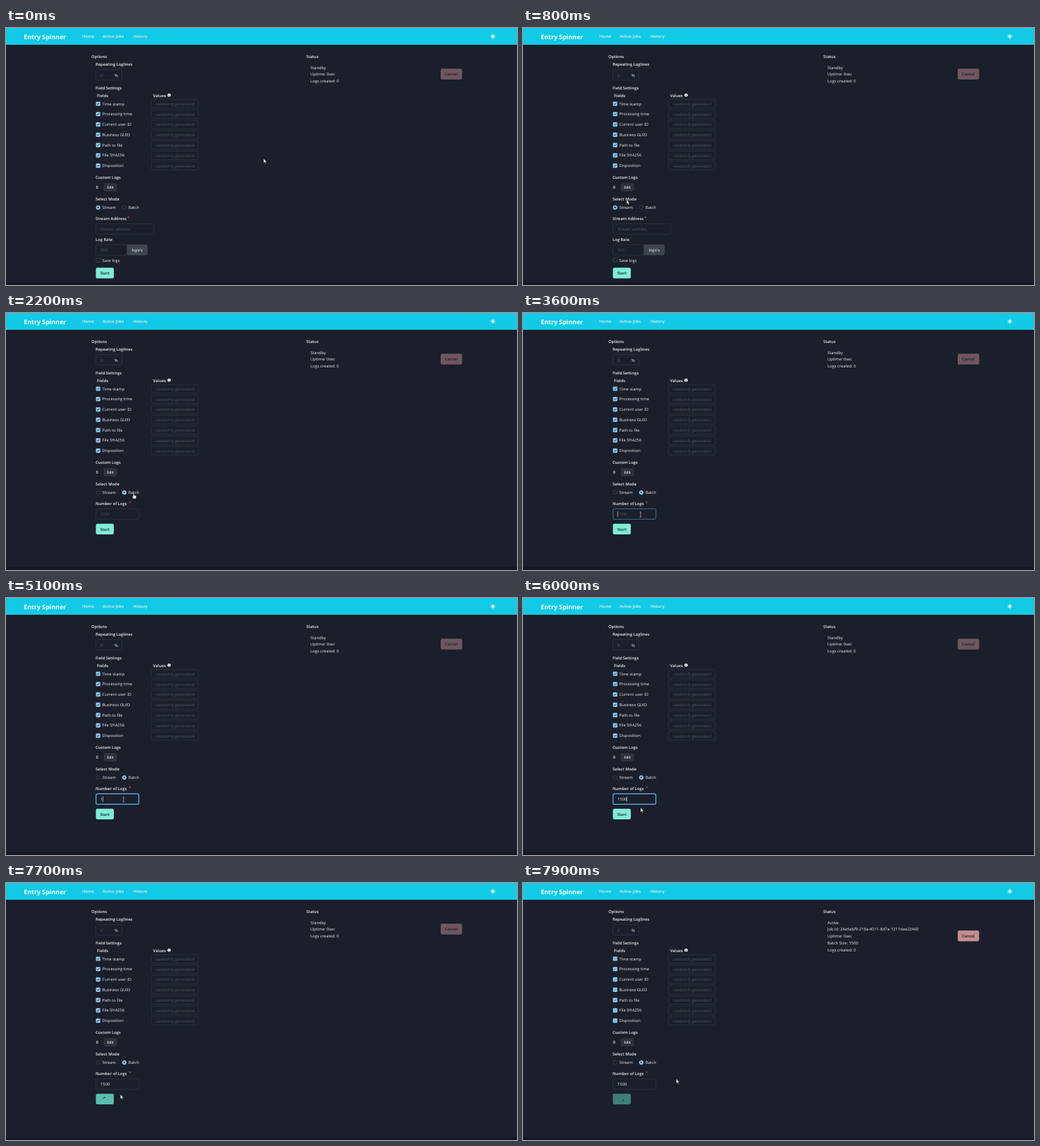
An HTML page that plays this animation: 730 px wide and 368 px high, repeating every 8000 ms.

```html
<!DOCTYPE html>
<html lang="en">
<head>
<meta charset="utf-8">
<title>Form demo</title>
<style>
  html, body { margin: 0; width: 100%; height: 100%; overflow: hidden; background: #1a1f2b; }
  svg { display: block; width: 730px; height: 368px; }
  text {
    font: 5.8px "Open Sans", "Noto Sans", sans-serif;
    fill: #eceef2; text-rendering: geometricPrecision; white-space: pre;
  }
  .bold { font-weight: 600; }
  .hint { fill: #505662; }
  .dark { fill: #1a202c; font-weight: 600; }
  .mid { text-anchor: middle; }
  .field { fill: none; stroke: #323743; stroke-width: .7; }
</style>
</head>
<body>
<svg id="stage" viewBox="0 0 730 368"></svg>
<script>
const LOOP = 8000, STEP = 100;
const BLUE = '#90cdf4', INK = '#1a202c';

// Markup helpers; text is placed by its vertical middle.
const text = (x, y, s, cls = '', extra = '') =>
  `<text x="${x}" y="${y + 2.1}" class="${cls}" ${extra}>${s}</text>`;
const bold = (x, y, s) => text(x, y, s, 'bold');
const rect = (x, y, w, h, extra) =>
  `<rect x="${x}" y="${y}" width="${w}" height="${h}" rx="2.2" ${extra}/>`;
const field = (x, y, w, h = 15) => rect(x, y, w, h, 'class="field"');
const group = (id, body) => `<g id="${id}">${body}</g>`;
const star = x => text(x, 272, '*', '', 'style="fill:#f06a72"');

const checkbox = y =>
  `<rect x="128.5" y="${y - 3.1}" width="6.2" height="6.2" rx=".8" fill="${BLUE}"/>
   <path class="tick" d="M130 ${y}l1.2 1.3 2.1-2.6" fill="none" stroke="${INK}" stroke-width=".9"/>`;

const radio = (id, x) =>
  `<circle cx="${x}" cy="257" r="2.7" fill="none" stroke="#3d4350" stroke-width=".7"/>` +
  group(id, `<circle cx="${x}" cy="257" r="3.1" fill="${BLUE}"/><circle cx="${x}" cy="257" r="1.3" fill="${INK}"/>`);

const sun = () => {
  let rays = '';
  for (let a = 0; a < 360; a += 45)
    rays += `<path d="M695.5 9.8V8.9" transform="rotate(${a} 695.5 12)"/>`;
  return `<circle cx="695.5" cy="12" r="1.8" fill="#fff"/><g stroke="#fff" stroke-width=".9" stroke-linecap="round">${rays}</g>`;
};

const fieldNames = ['Time stamp', 'Processing time', 'Current user ID', 'Business GUID',
  'Path to file', 'File SHA256', 'Disposition'];
const fieldRows = fieldNames.map((name, i) => {
  const y = 108.5 + i * 14.77;
  return checkbox(y) + text(137.5, y, name) + field(207.6, y - 6.1, 67.3, 12.3) +
    text(214, y + .3, 'randomly generated', 'hint');
}).join('');

const lines = list => list.map((s, i) => text(435, 56.5 + i * 9.75, s)).join('');

const header = `<rect width="730" height="24" fill="#12cae6"/>
  <rect y="364" width="730" height="4" fill="#151724"/>` +
  text(25.5, 13.9, 'Entry Spinner', '', 'style="font-size:8.9px;font-weight:700;fill:#fff"') +
  bold(109, 12.3, 'Home') + bold(138, 12.3, 'Active Jobs') + bold(182, 12.3, 'History') + sun();

const options = bold(122, 40.5, 'Options') + bold(128, 51.5, 'Repeating Loglines') +
  field(128.5, 59.5, 37) + text(135, 67.5, '0', 'hint') + text(157.5, 67.5, '%', 'mid') +
  bold(128, 85.5, 'Field Settings') + bold(130, 96.5, 'Fields') + bold(210, 96.5, 'Values') +
  `<circle cx="233" cy="96.2" r="2.4" fill="#eceef2"/>
   <path d="M233 95.9v1.7M233 94.6v.7" stroke="${INK}" stroke-width=".7"/>` +
  fieldRows + bold(128, 214.3, 'Custom Logs') + bold(128.5, 228, '0') +
  rect(139.5, 222, 19.2, 12, 'fill="#2d323d"') +
  text(149.1, 227.6, 'Edit', 'bold mid', 'style="font-size:5.1px"') +
  bold(128, 245, 'Select Mode') + radio('streamDot', 131.6) + text(137.5, 257.2, 'Stream') +
  radio('batchDot', 169) + text(175, 257.2, 'Batch');

const streamForm = bold(128, 272.5, 'Stream Address') + star(173.3) +
  field(128.5, 280.4, 82.6) + text(135, 288.2, 'Stream address', 'hint') +
  bold(128, 302.5, 'Log Rate') + field(128.5, 310.2, 73.5) + text(135, 318, '300', 'hint') +
  `<path d="M172.5 309.9h27.4a2.2 2.2 0 0 1 2.2 2.2v11a2.2 2.2 0 0 1-2.2 2.2h-27.4z" fill="#3f444f"/>` +
  text(187.3, 317.8, 'logs/s', 'mid') +
  `<rect x="128.8" y="329.6" width="5.6" height="5.6" rx=".8" class="field" style="stroke:#444a56"/>` +
  text(137.5, 332.6, 'Save logs') +
  rect(128.4, 343.3, 25.6, 15.3, 'fill="#80edd6"') + text(141.2, 351.2, 'Start', 'dark mid');

const batchForm = bold(128, 272.5, 'Number of Logs') + star(175.2) + field(128.5, 280.4, 61.4) +
  rect(128.6, 280.4, 61.2, 15, 'id="focus" fill="none" stroke="#63b3ed" stroke-width="1.2"') +
  text(135, 288.2, '1000', 'hint', 'id="hint"') + text(135, 288.2, '', '', 'id="typed"') +
  '<path id="caret" d="M0 284v8" stroke="#eceef2" stroke-width=".6"/>' +
  rect(128.4, 301.7, 25.6, 15.3, 'id="start"') + text(141.2, 309.6, 'Start', 'dark mid', 'id="startLabel"') +
  `<path id="spinner" d="M2.6 0A2.6 2.6 0 0 1 0 2.6" fill="none" stroke="${INK}" stroke-width=".9"/>`;

const status = bold(429, 40.5, 'Status') +
  group('standby', lines(['Standby', 'Uptime: 0sec', 'Logs created: 0'])) +
  group('active', lines(['Active', 'Job id: 24a9a6f9-219a-4011-8d7a-1211dae22460',
    'Uptime: 0sec', 'Batch Size: 1500', 'Logs created: 0'])) +
  group('cancel', rect(621, 58.3, 30.6, 15.4, 'fill="#f0a8ae"') + text(636.3, 66.1, 'Cancel', 'dark mid'));

const pointers =
  `<path id="arrow" d="M0 0V6.3L1.5 5 2.5 7.2 3.4 6.8 2.5 4.6H4.4Z" fill="#fff" stroke="#111" stroke-width=".4"/>
   <path id="hand" d="M-.7 .6Q0-.3 .6 .6V3.3L3 3.9Q3.9 4.2 3.7 5.2L3 8.4H-.3L-2.2 5.4Q-2.2 4.4-.7 5.4Z" fill="#fff" stroke="#111" stroke-width=".4"/>
   <path id="beam" d="M-1.3-3.4H1.3M0-3.4V3.4M-1.3 3.4H1.3" fill="none" stroke="#c9ccd3" stroke-width=".6"/>`;

const stage = document.getElementById('stage');
stage.innerHTML = header + options + group('streamForm', streamForm) +
  group('batchForm', batchForm) + status + pointers;

const $ = id => document.getElementById(id);
const show = (id, on) => { $(id).style.display = on ? '' : 'none'; };
const ramp = (t, from, to) => Math.min(1, Math.max(0, (t - from) / (to - from)));
const mix = (a, b, k) => a + (b - a) * k;

// Pointer stops: time, x, y.
const pointerPath = [
  [200, 368, 187], [800, 148, 246], [1100, 202, 252], [1500, 182.4, 257.6], [2400, 182.4, 257.6],
  [3300, 168, 288.5], [5600, 168, 288.5], [6300, 168, 308], [6500, 168, 308],
  [6800, 120.5, 311.3], [7400, 144, 310.5], [7600, 144, 310.5], [7900, 219, 280.5]
];

function pointerAt(t) {
  const next = pointerPath.findIndex(p => p[0] > t);
  if (next === 0) return pointerPath[0].slice(1);
  if (next < 0) return pointerPath.at(-1).slice(1);
  const [t0, x0, y0] = pointerPath[next - 1], [t1, x1, y1] = pointerPath[next];
  const k = ramp(t, t0, t1), eased = k * k * (3 - 2 * k);
  return [mix(x0, x1, eased), mix(y0, y1, eased)];
}

function pointerShape(t) {
  if ((t >= 1300 && t < 2600) || (t >= 7100 && t < 7700)) return 'hand';
  return t >= 3100 && t < 5900 ? 'beam' : 'arrow';
}

function typedAt(t) {
  if (t < 5100) return '';
  return '1500'.slice(0, t < 5300 ? 1 : 2 + (t - 5300) / 100);
}

function draw(t) {
  const batch = t >= 2200, loading = t >= 7700, active = t >= 7800;
  show('streamDot', !batch);
  show('batchDot', batch);
  show('streamForm', !batch);
  show('batchForm', batch);

  const typed = typedAt(t);
  $('typed').textContent = typed;
  show('hint', !typed);
  $('focus').style.opacity = ramp(t, 3500, 3800) * (1 - ramp(t, 6000, 6200));
  show('caret', t >= 3600 && t < 6100 && !(t >= 4200 && t < 4700));
  $('caret').setAttribute('transform', `translate(${135.2 + typed.length * 3.32} 0)`);

  const hover = t >= 7000 ? ramp(t, 6900, 7200) : t >= 6700 && t < 6900 ? .3 : 0;
  $('start').setAttribute('fill', `rgb(${mix(128, 100, hover)},${mix(237, 222, hover)},${mix(214, 200, hover)})`);
  $('start').style.opacity = mix(1, .5, ramp(t, 7600, 7900));
  show('startLabel', !loading);
  show('spinner', loading);
  $('spinner').setAttribute('transform', `translate(141.2 309.6) rotate(${(t - 7900) / 450 * 360})`);

  show('standby', !active);
  show('active', active);
  $('cancel').setAttribute('transform', `translate(0 ${active ? 9.75 : 0})`);
  $('cancel').style.opacity = mix(.4, 1, ramp(t, 7750, 7980));
  for (const tick of document.querySelectorAll('.tick')) tick.style.opacity = active ? .5 : 1;

  const [x, y] = pointerAt(t), shape = pointerShape(t);
  for (const id of ['arrow', 'hand', 'beam']) show(id, id === shape);
  $(shape).setAttribute('transform', `translate(${x} ${y})`);
}

const origin = performance.now();
function tick(now) {
  const t = Math.max(0, now - origin) % LOOP;
  draw(Math.floor(t / STEP) * STEP);
  requestAnimationFrame(tick);
}
draw(0);
requestAnimationFrame(tick);
</script>
</body>
</html>
```
